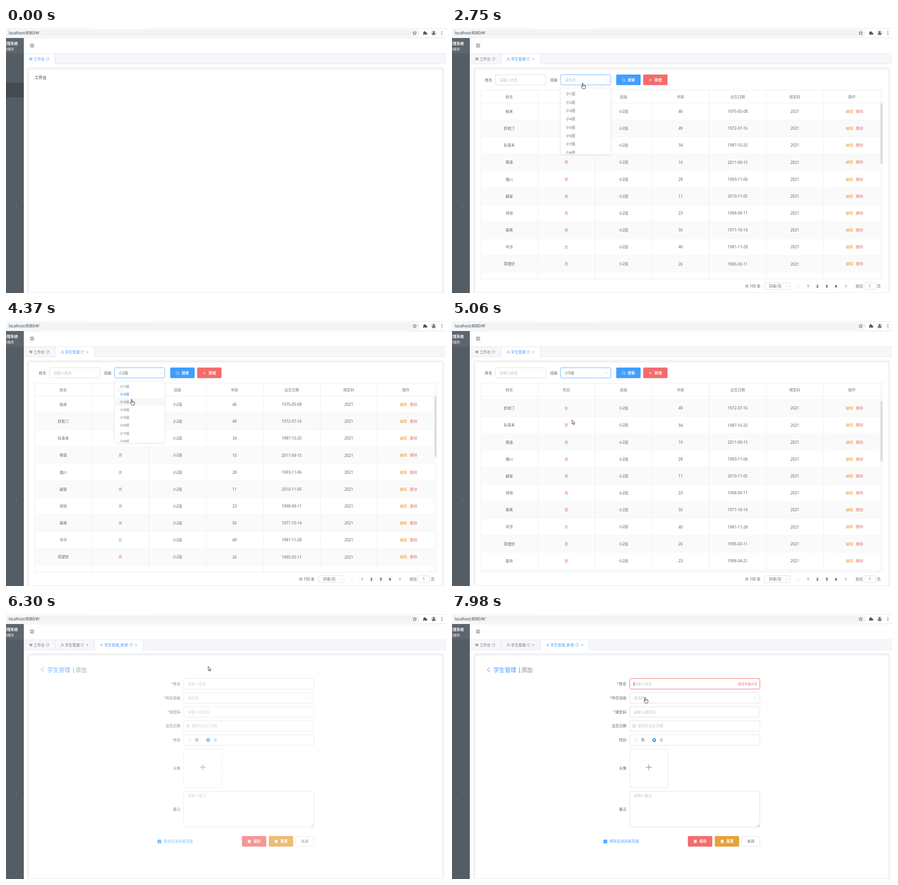
These frames come from a looping animation (964x581 px, 8 s). An HTML page:

```html
<!DOCTYPE html>
<html lang="zh">
<head>
<meta charset="utf-8">
<title>学生管理</title>
<style>
html, body { margin: 0; width: 100%; height: 100%; overflow: hidden; background: #fff; }
svg { display: block; width: 964px; height: 581px; }
text { font: 8px "Noto Sans", "Noto Sans CJK SC", "Noto Sans CJK", sans-serif; fill: #606266; white-space: pre; }
.mid { text-anchor: middle; }
.end { text-anchor: end; }
.bold { font-weight: 700; }
.num { font-size: 8.4px; }
.small { font-size: 7px; }
.hint { fill: #c0c4cc; }
.blue { fill: #409eff; }
.red { fill: #f56c6c; }
.green { fill: #67c23a; }
.amber { fill: #e6a23c; }
.white { fill: #fff; }
.field { fill: #fff; stroke: #dcdfe6; }
.rule { fill: none; stroke: #ebeef5; }
.icon { fill: none; stroke: currentColor; }

/* One loop is 8 s: 1% = 80 ms */
[class*="t-"] { animation: 8s step-end infinite; }
.t-menu { animation-name: menu; animation-timing-function: linear; }
.t-home { animation-name: home; }
.t-list { animation-name: list; }
.t-data { animation-name: data; }
.t-form { animation-name: form; }
.t-tab1 { animation-name: tab1; }
.t-tab2 { animation-name: tab2; }
.t-tab3 { animation-name: tab3; }
.t-focus { animation-name: focus; stroke-width: .8; }
.t-ask { animation-name: ask; }
.t-val2 { animation-name: val2; }
.t-val5 { animation-name: val5; }
.t-pick2 { animation-name: pick2; }
.t-pick5 { animation-name: pick5; }
.t-drop { animation-name: drop; }
.t-turn { animation-name: turn; }
.t-caret { animation-name: caret; }
.t-clear { animation-name: clear; }
.t-hover { animation-name: hover; }
.t-rows { animation-name: rows; }
.t-thumb { animation-name: thumb; }
.t-name { animation-name: name; }
.t-typing { animation-name: typing; }
.t-error { animation-name: error; }
.t-move { animation-name: move; animation-timing-function: linear; }
.t-arrow { animation-name: arrow; }
.t-beam { animation-name: beam; }
.t-hand { animation-name: hand; }

@keyframes menu {
  0%, 3.74% { transform: translateY(0); opacity: 1; }
  3.75%, 13.125% { transform: translateY(32px); opacity: 1; }
  15.625%, 100% { transform: translateY(32px); opacity: 0; }
}
@keyframes home { 0% { opacity: 1; } 9.375%, 100% { opacity: 0; } }
@keyframes list { 0% { opacity: 0; } 9.375% { opacity: 1; } 77.5%, 100% { opacity: 0; } }
@keyframes data { 0% { opacity: 0; } 12.125%, 100% { opacity: 1; } }
@keyframes form {
  0% { opacity: 0; }
  77.5% { opacity: 0; animation-timing-function: ease; }
  80.5%, 100% { opacity: 1; }
}
@keyframes tab1 {
  0% { color: #409eff; --bg: #fff; }
  12.125%, 100% { color: #73767a; --bg: transparent; }
}
@keyframes tab2 {
  0% { opacity: 0; color: #73767a; --bg: transparent; }
  9.375% { opacity: 1; color: #73767a; --bg: transparent; }
  12.125% { opacity: 1; color: #409eff; --bg: #fff; }
  77.5%, 100% { opacity: 1; color: #73767a; --bg: transparent; }
}
@keyframes tab3 { 0% { opacity: 0; } 77.5%, 100% { opacity: 1; } }
@keyframes focus { 0% { stroke: #dcdfe6; } 32.53%, 100% { stroke: #409eff; } }
@keyframes ask { 0% { opacity: 1; } 42.875%, 100% { opacity: 0; } }
@keyframes val2 { 0% { opacity: 0; } 42.875% { opacity: 1; } 60.375%, 100% { opacity: 0; } }
@keyframes val5 { 0% { opacity: 0; } 60.375%, 100% { opacity: 1; } }
@keyframes pick2 {
  0% { fill: #606266; font-weight: 400; }
  42.875% { fill: #409eff; font-weight: 700; }
  60.375%, 100% { fill: #606266; font-weight: 400; }
}
@keyframes pick5 {
  0% { fill: #606266; font-weight: 400; }
  60.375%, 100% { fill: #409eff; font-weight: 700; }
}
@keyframes drop {
  0%, 46.625%, 64.125%, 100% { transform: scaleY(0); opacity: 0; }
  32.53%, 53.3% { transform: scaleY(0); opacity: 0; animation-timing-function: cubic-bezier(.23, 1, .32, 1); }
  36.28%, 57.05% { transform: scaleY(1); opacity: 1; }
  42.875%, 60.375% { transform: scaleY(1); opacity: 1; animation-timing-function: cubic-bezier(.23, 1, .32, 1); }
}
@keyframes turn {
  0%, 46.625%, 64.125%, 100% { transform: rotate(180deg); }
  32.53%, 53.3% { transform: rotate(180deg); animation-timing-function: ease; }
  36.28%, 57.05% { transform: rotate(0); }
  42.875%, 60.375% { transform: rotate(0); animation-timing-function: ease; }
}
@keyframes caret { 0%, 53.3%, 71.375%, 100% { opacity: 1; } 46.25%, 68.75% { opacity: 0; } }
@keyframes clear { 0%, 53.3%, 71.375%, 100% { opacity: 0; } 46.25%, 68.75% { opacity: 1; } }
@keyframes hover {
  0% { opacity: 0; transform: translateY(0); }
  35.875% { opacity: 1; transform: translateY(0); }
  37.5% { opacity: 1; transform: translateY(19.04px); }
  54.25% { opacity: 1; transform: translateY(38.08px); }
  55.625% { opacity: 1; transform: translateY(57.12px); }
  57%, 100% { opacity: 1; transform: translateY(76.16px); }
}
@keyframes rows {
  0% { transform: none; }
  61.875% { transform: translateY(0); animation-timing-function: ease-in-out; }
  68.125%, 100% { transform: translateY(-285.5px); }
}
@keyframes thumb {
  0% { transform: none; }
  61.875% { transform: translateY(0); animation-timing-function: ease-in-out; }
  68.125%, 100% { transform: translateY(98.5px); }
}
@keyframes name { 0% { stroke: #dcdfe6; } 95.25% { stroke: #409eff; } 98.75%, 100% { stroke: #f56c6c; } }
@keyframes typing { 0% { opacity: 0; } 95.25%, 100% { opacity: 1; } }
@keyframes error { 0% { opacity: 0; } 98.75%, 100% { opacity: 1; } }
@keyframes move {
  0%, 14.875% { transform: translate(209.5px, 157px); }
  18.625%, 22.25% { transform: translate(195px, 117px); }
  23.25%, 25.125% { transform: translate(198px, 121px); }
  31.875%, 35.875% { transform: translate(288px, 127px); }
  40.875%, 42.875% { transform: translate(276px, 163px); }
  46.875%, 52% { transform: translate(275.5px, 116px); }
  52.125%, 53.3% { transform: translate(275.5px, 123px); }
  54.625% { transform: translate(277px, 178px); }
  58.375%, 66.875% { transform: translate(266px, 222px); }
  69.375%, 71.375% { transform: translate(245px, 121px); }
  76.25%, 85.125% { transform: translate(446px, 120px); }
  87%, 88.75% { transform: translate(444.5px, 145px); }
  94.375%, 96.25% { transform: translate(440px, 153px); }
  98.75%, 100% { transform: translate(425px, 189px); }
}
@keyframes arrow {
  0%, 17%, 28%, 68%, 75%, 86.5%, 100% { opacity: 0; }
  14.5%, 25.9%, 61.25%, 72.5%, 78% { opacity: 1; }
}
@keyframes beam { 0%, 25.9%, 98%, 100% { opacity: 0; } 17%, 86.5% { opacity: 1; } }
@keyframes hand {
  0%, 61.25%, 72.5%, 78% { opacity: 0; }
  28%, 68%, 75%, 98%, 100% { opacity: 1; }
}
</style>
</head>
<body>
<svg id="stage" viewBox="0 0 964 581"></svg>
<script>
const GREY = '#606266', PALE = '#c0c4cc', BLUE = '#409eff';
const ROW = 37.17, COL = 125.1, ITEM = 19.04;

const text = (x, y, s, cls = '', more = '') =>
  `<text x="${x}" y="${y}" dy=".36em" class="${cls}" ${more}>${s}</text>`;
const rect = (x, y, w, h, fill, r = 0, more = '') =>
  `<rect x="${x}" y="${y}" width="${w}" height="${h}" rx="${r}" fill="${fill}" ${more}/>`;
const field = (x, y, w, h, cls = '') =>
  `<rect x="${x + .5}" y="${y + .5}" width="${w - 1}" height="${h - 1}" rx="2.5" class="field ${cls}"/>`;
const line = (d, cls = 'rule') => `<path d="${d}" class="${cls}"/>`;
const icon = (x, y, d, color = 'currentColor', w = .8) =>
  `<path class="icon" transform="translate(${x} ${y})" d="${d}" style="color:${color}" stroke-width="${w}"/>`;
const group = (cls, ...parts) => `<g class="${cls}">${parts.join('')}</g>`;
const at = (x, y, ...parts) => `<g transform="translate(${x} ${y})">${parts.join('')}</g>`;

const ICON = {
  up: 'M-2.8 1.4L0-1.4L2.8 1.4',
  down: 'M-2.8-1.4L0 1.4L2.8-1.4',
  left: 'M1.4-2.8L-1.4 0L1.4 2.8',
  right: 'M-1.4-2.8L1.4 0L-1.4 2.8',
  plus: 'M-3 0H3M0-3V3',
  close: 'M-2-2L2 2M2-2L-2 2',
  reload: 'M2.7-1.2A3 3 0 1 0 2.9.8M2.9-2.8V-1H1.1',
  user: 'M0-3.2a1.6 1.6 0 1 1-.01 0M-3 3.3Q-2.8.8 0 .8T3 3.3',
  screen: 'M-2.7-2.2H2.7V1H-2.7ZM-1.6 2.6H1.6M-2-1.2H2M-2 0H2',
  search: 'M0-3.2a3.1 3.1 0 1 1-.01 0M2 2.2L3.5 3.5',
  clear: 'M0-3.3a3.3 3.3 0 1 1-.01 0M-1.2-1.2L1.2 1.2M1.2-1.2L-1.2 1.2',
  date: 'M-3-2.5H3V3H-3ZM-3-.9H3M-1.5-3.5V-2M1.5-3.5V-2M-1.8.4H1.8M-1.8 1.7H1.8',
};

function browser() {
  return rect(0, 0, 964, 1, '#e4e6ea') + rect(181, 0, 134, 1, '#fff') +
    rect(-20, 3, 926, 16, '#f1f3f4', 8) + rect(0, 21, 964, 1, '#dfe1e5') +
    text(6, 11, 'localhost:8080/#/', '', 'style="font-size:8.25px;fill:#3c4043"') +
    icon(0, 11, 'M-2-2.5Q1 0-2 2.5', '#5f6368') +
    icon(895.5, 11, 'M0-4L1.1-1.3L4-1.1L1.8.8L2.5 3.6L0 2.1L-2.5 3.6L-1.8.8L-4-1.1L-1.1-1.3Z', '#4d5156', .9) +
    `<path transform="translate(918 11)" fill="#4d5156" d="M-4-2H-2.2a1.5 1.5 0 1 1 2.8 0H3V.2a1.4 1.4 0 1 1 0 2.2V4H.9a1.4 1.4 0 0 0-2.8 0H-4V1.8a1.4 1.4 0 0 0 0-2.6Z"/>` +
    '<circle cx="937" cy="11" r="6.3" fill="#dde1e7"/><circle cx="937" cy="9" r="1.9" fill="#475569"/>' +
    rect(933.3, 11.6, 7.4, 2.8, '#475569', 1.3) +
    [7.6, 11, 14.4].map(y => `<circle cx="955" cy="${y}" r=".9" fill="#4d5156"/>`).join('');
}

function sidebar() {
  return rect(0, 22, 39, 559, '#545c64') + rect(0, 22, 39, 34, '#5e656d') +
    rect(0, 120, 39, 32, '#434a50', 0, 'class="t-menu"') +
    text(26, 34, '管理系统', 'white bold end') + text(17.5, 46, '的服务', 'white end small') +
    rect(22, 390.5, 4, 1, '#7d848b');
}

function tab(cls, x, end, glyph, label, closable) {
  const reload = end - (closable ? 26 : 16);
  return group(cls,
    rect(x, 57, end - x, 22, 'var(--bg, #fff)'), rect(end, 57, 1, 21, '#dfe3ea'),
    icon(x + 15.5, 68, glyph), text(x + 21.5, 68, label, '', 'style="fill:currentColor"'),
    icon(reload, 68, ICON.reload, 'currentColor', .7),
    closable ? icon(end - 15, 68, ICON.close, 'currentColor', .7) : '');
}

function frame() {
  return rect(39, 22, 925, 559, '#fff') +
    icon(57.5, 38.5, 'M-4.5-3H4M-1 0H4M-4.5 3H4M-2-1.4L-4 0L-2 1.4', '#303133', .9) +
    rect(39, 56, 925, 23, '#f5f7fa') + rect(39, 56, 925, 1, '#e4e7ed') + rect(39, 78, 925, 1, '#e4e7ed') +
    tab('t-tab1', 39, 107, ICON.screen, '工作台') +
    tab('t-tab2', 108, 193, ICON.user, '学生管理', true) +
    `<g style="color:${BLUE}">${tab('t-tab3', 194, 300, ICON.plus, '学生管理_新增', true)}</g>` +
    rect(46, 86, 914, 500, '#f2f2f2', 6) + rect(51, 91, 904.5, 488.5, '#fff', 1);
}

function button(x, y, color, label, glyph) {
  return rect(x - .2, y, 53.4, 23.2, color, 2) + glyph + text(x + 33, y + 11.7, label, 'white mid bold');
}

const people = `柏禾 女 46 1975-05-08
舒若汀 女 49 1972-07-16
阮青禾 男 34 1987-10-25
穆遥 男 10 2011-09-15
骆川 男 28 1993-11-06
郦棠 男 11 2010-11-05
祁垣 男 23 1998-09-11
蔺苒 男 50 1971-10-14
岑汐 女 40 1981-11-28
简望舒 男 26 1995-03-11
晏舟 男 23 1998-04-21
柯砚 女 16 2005-02-03
卓砺 男 36 1985-05-22
荀霏 男 11 2010-12-10
苗笙 男 3 2018-03-06
虞知微 男 33 1988-08-24
冉恺 男 21 2000-10-27
穆遥 男 37 1984-10-07
褚澄 女 18 2003-06-19`.split('\n').map(s => s.split(' '));

const colX = i => +(125.5 + COL * i).toFixed(1);

function row([name, sex, age, born], i) {
  const top = 164.5 + ROW * i, y = (top + ROW / 2).toFixed(1);
  return rect(63, top, 876, ROW, i % 2 ? '#fafafa' : '#fff') + rect(63, top + ROW - .5, 876, 1, '#ebeef5') +
    text(colX(0), y, name, 'mid') + text(colX(1), y, sex, 'mid ' + (sex === '女' ? 'green' : 'red')) +
    text(colX(2), y, '小2班', 'mid') + text(colX(3), y, age, 'mid num') +
    text(colX(4), y, born, 'mid num') + text(colX(5), y, '2021', 'mid num') +
    text(870.5, y, '编辑', 'mid amber') + text(893, y, '删除', 'mid red');
}

const columns = (y1, y2) =>
  line([1, 2, 3, 4, 5, 6, 7].map(i => `M${Math.floor(63 + COL * i) + .5} ${y1}V${y2}`).join(''));

function pager() {
  return text(659, 566, '共 100 条', 'mid') + field(684, 558, 57, 16) + text(708, 566, '30条/页', 'mid') +
    icon(733.5, 566, ICON.down, PALE, .7) + icon(758, 566, ICON.left, PALE) +
    [780, 800.5, 821, 841].map((x, i) => text(x, 566, i + 1, 'mid bold ' + (i ? '' : 'blue'), i ? 'style="fill:#303133"' : '')).join('') +
    icon(863, 566, ICON.right, '#303133') + text(892.5, 566, '前往', 'mid') +
    field(902, 558, 27, 16) + text(915, 566, 1, 'mid') + text(935, 566, '页', 'mid');
}

function listPage() {
  const heads = ['姓名', '性别', '班级', '年龄', '出生日期', '绑定码', '操作'];
  return group('t-list',
    text(80, 114, '姓名', 'mid'), field(95, 102, 111, 23.4), text(104, 114, '请输入姓名', 'hint'),
    text(223, 114, '班级', 'mid'), field(237.4, 102, 111, 23.4, 't-focus'),
    text(247, 114, '请选择', 'hint t-ask'), text(247, 114, '小2班', 't-val2'), text(247, 114, '小5班', 't-val5'),
    at(338.5, 114, group('t-caret', group('t-turn', icon(0, 0, ICON.up, PALE))),
      group('t-clear', icon(0, 0, ICON.clear, PALE, .7))),
    button(360, 102, BLUE, '搜索', icon(376, 114, ICON.search, '#fff')),
    button(419, 102, '#f56c6c', '新增', icon(434.5, 114, ICON.plus, '#fff')),
    line('M63.5 136.5H943.5V550.5H63.5ZM63.5 164.5H943'), columns(137, 164),
    line('M938.5 137V164'),
    heads.map((s, i) => text(colX(i), 151, s, 'mid', 'style="fill:#73767a"')).join(''),
    group('t-data',
      '<g clip-path="url(#body)">' + group('t-rows', people.map(row).join('')) + '</g>',
      columns(165, 550), line('M63.5 165V550M938.5 165V550'),
      rect(939, 165, 4, 133, '#dddee0', 2, 'class="t-thumb"'), pager()),
    dropdown());
}

function dropdown() {
  const items = [1, 2, 3, 4, 5, 6, 7, 8].map((n, i) =>
    text(11.5, 12.9 + ITEM * i, `小${n}班`, n === 2 ? 't-pick2' : n === 5 ? 't-pick5' : ''));
  return at(238, 132, group('t-drop',
    rect(0, 0, 110, 150.5, '#fff', 2, 'stroke="#e4e7ed" stroke-width=".8" filter="url(#shade)"'),
    '<path d="M20.5 .2L24-3.2L27.5 .2Z" fill="#fff" stroke="none"/>',
    '<g clip-path="url(#menu)">' + rect(.4, 3.4, 109.2, ITEM, '#f5f7fa', 0, 'class="t-hover"') + items.join('') + '</g>'));
}

function formPage() {
  const star = '<tspan fill="#f56c6c">*</tspan>';
  const label = (y, s) => text(382, y, s, 'end');
  const input = (y, name, hint, x = 398, cls = '') =>
    label(y, name) + field(389, y - 12, 286, 24, cls) + text(x, y, hint, 'hint');
  const pad = x => rect(x - 3, 495.3, 6, 6.4, '#fff', .8) + rect(x - 1.4, 497.6, 2.8, 1, '#d98b6a');
  return group('t-form',
    icon(80, 122, 'M2.5-4.8L-2.5 0L2.5 4.8', GREY, 1),
    text(90.5, 122, '学生管理', 'blue', 'style="font-size:12.6px"'),
    text(144.5, 122, '|', '', 'style="font-size:12.6px"'),
    text(151.5, 122, '添加', '', 'style="font-size:12.6px;fill:#85878b"'),
    input(153, star + '姓名', '请输入姓名', 398, 't-name'),
    rect(398, 149, .8, 9, '#303133', 0, 'class="t-typing"'),
    text(669, 153.5, '姓名不能为空', 'red end small t-error'),
    input(184, star + '所在班级', '请选择'), icon(664, 184, ICON.down, PALE),
    input(214.7, star + '绑定码', '请输入绑定码'),
    input(245.5, '出生日期', '请填写出生日期', 406.5), icon(399, 245.5, ICON.date, PALE, .7),
    input(276.3, '性别', ''),
    '<circle cx="402" cy="276.5" r="3.8" class="field"/>', text(418, 276.5, '男', 'mid'),
    '<circle cx="443" cy="276.5" r="4.2" class="blue"/><circle cx="443" cy="276.5" r="1.4" class="white"/>',
    text(459, 276.5, '女', 'mid blue'),
    label(338.5, '头像'),
    rect(389.5, 296.5, 84, 84, '#fff', 3, 'stroke="#cfd1d6" stroke-dasharray="2 1.5"'),
    icon(431, 336, 'M-6.5 0H6.5M0-6.5V6.5', '#73767a', 1),
    label(428, '备注'), field(389, 388, 286, 79.5), text(398, 398, '请输入备注', 'hint'),
    icon(671, 464, 'M-2.5 2.5L2.5-2.5M.3 2.5L2.5 .3', '#73767a', .7),
    rect(332, 494.7, 8, 8, BLUE, 1.2), icon(336, 498.7, 'M-2 0L-.6 1.5L2-1.5', '#fff', 1),
    text(345.5, 498.5, '保存后关闭该页面', 'blue'),
    button(517, 486.8, '#f56c6c', '保存', pad(533)),
    button(576, 486.8, '#e6a23c', '重置', pad(592)),
    field(634, 487, 41, 23), text(654.5, 498.5, '关闭', 'mid'));
}

function pointer() {
  const ink = 'fill="#fff" stroke="#111" stroke-width=".8" stroke-linejoin="round"';
  return group('t-move',
    group('t-arrow', `<path ${ink} d="M-3-5V4L-.9 2.2L.6 5.4L2 4.8L.6 1.6H3.4Z"/>`),
    group('t-beam', icon(0, 0, 'M-2-5Q0-5 0-4Q0-5 2-5M0-4V4M-2 5Q0 5 0 4Q0 5 2 5', '#222', 1)),
    group('t-hand', `<path ${ink} d="M-2.6 1.6V-5.4Q-2.6-6.5-1.7-6.5T-.8-5.4V-1.6Q.2-2.2 1-1.2Q2-1.7 2.7-.8Q4.6-1 4.6.8V3Q4.4 4.6 3.6 6.3H-1.8Q-2.2 4.6-4.6 1.6Q-5 .2-3.8.2Z"/>`,
      icon(0, 0, 'M-.8-1.6V.6M1-1.2V.8M2.7-.8V1', '#111', .6)));
}

document.getElementById('stage').innerHTML = `<defs>
  <clipPath id="body"><rect x="63" y="165" width="876" height="385"/></clipPath>
  <clipPath id="menu"><rect width="110" height="149"/></clipPath>
  <filter id="shade" x="-10%" y="-10%" width="120%" height="120%">
    <feDropShadow dx="0" dy="1" stdDeviation="2.5" flood-opacity=".12"/>
  </filter></defs>` +
  browser() + frame() + sidebar() +
  text(63, 108.5, '工作台', 't-home', 'style="font-size:8.6px;fill:#303133"') +
  listPage() + formPage() + pointer();
</script>
</body>
</html>
```
